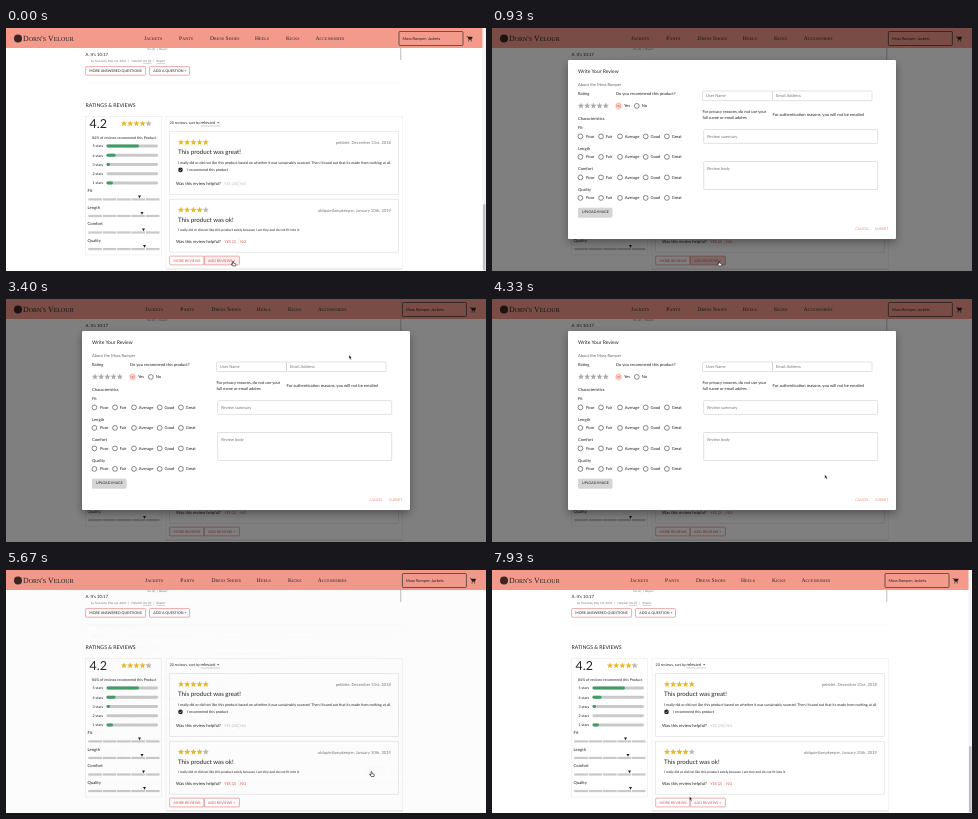
These frames come from a looping animation (480x243 px, 8000 ms). An HTML page:

```html
<!DOCTYPE html>
<html lang="en">
<head>
<meta charset="utf-8">
<title>Product reviews</title>
<style>
  html, body { margin: 0; width: 100%; height: 100%; overflow: hidden; background: #fff; }
  svg { display: block; width: 100%; height: 100%; }
  text { font-family: Lato, "Open Sans", sans-serif; text-rendering: geometricPrecision; white-space: pre; }
  .serif text { font-family: "Liberation Serif", "Noto Serif", serif; font-variant: small-caps; }
</style>
</head>
<body>
<svg id="stage" viewBox="0 0 480 243" xmlns="http://www.w3.org/2000/svg"></svg>
<script>
const LOOP = 8000;
const OPEN = 565, OPEN_MS = 225, CLOSE = 5495, CLOSE_MS = 215;
const INK = '#222', RED = '#d9534f', CORAL = '#ec8a7a', GOLD = '#e9b824', GREY = '#aaa';

// Markup helpers
const text = (x, y, size, str, fill = INK, extra = '') =>
  `<text x="${x}" y="${y}" font-size="${size}" fill="${fill}" ${extra}>${str}</text>`;
const rect = (x, y, w, h, fill, extra = '') =>
  `<rect x="${x}" y="${y}" width="${w}" height="${h}" fill="${fill}" ${extra}/>`;
const line = (x1, y1, x2, y2, stroke, w = .5) =>
  `<path d="M${x1} ${y1}L${x2} ${y2}" stroke="${stroke}" stroke-width="${w}"/>`;
const stroke = (color, w = .5) => `stroke="${color}" stroke-width="${w}"`;
const bold = 'font-weight="700"';

function star(cx, cy, r, fill) {
  let d = '';
  for (let i = 0; i < 10; i++) {
    const a = Math.PI * (i / 5 - .5), q = i % 2 ? r * .45 : r;
    d += (i ? 'L' : 'M') + (cx + q * Math.cos(a)).toFixed(2) + ' ' + (cy + q * Math.sin(a)).toFixed(2);
  }
  return `<path d="${d}Z" fill="${fill}"/>`;
}
const stars = (x, y, full, empty = '#bbb') =>
  [0, 1, 2, 3, 4].map(i => star(x + 6.2 * i, y, 3.2, i < full ? GOLD : empty)).join('');

const outlined = (x, y, w, h, label, tx, color) =>
  rect(x, y, w, h, 'none', stroke('#e58a8a', .7) + ' rx=".8"') + text(tx, y + 5.8, 3.6, label, color);

function header() {
  return `<g id="bar">${rect(0, 0, 480, 20, '#f39a8b')}</g>
    <circle cx="12" cy="10.5" r="4" fill="#3a2522"/>
    <g class="serif">${text(17, 13.3, 7.9, "Dorn's Velour")}<g id="nav"></g></g>
    <g id="search">${rect(393, 3.5, 64, 14, 'none', stroke('#333', .7) + ' rx=".8"')}
      ${text(396.5, 11.9, 3.9, 'Moss Romper; Jackets')}
      <path d="M460.6 8.4h1l1.2 3h2.6l.9-2.4h-4.2" fill="#222" stroke="#222" stroke-width=".5"/>
      <circle cx="462.7" cy="12.8" r=".6" fill="#222"/><circle cx="465.2" cy="12.8" r=".6" fill="#222"/></g>`;
}

function summary() {
  const fills = [32.5, 9, 3.5, 0, 6.5];
  const bars = fills.map((w, i) => {
    const y = 118 + 9.25 * i;
    return text(86.5, y + 1.3, 3.65, `${5 - i} star${i < 4 ? 's' : 's'}`) +
      rect(100.5, y - 1.4, 51.5, 2.8, '#c9c9c9', 'rx="1.4"') +
      (w ? rect(100.5, y - 1.4, w, 2.8, '#3f9d63', 'rx="1.4"') : '');
  }).join('');
  const marks = { Fit: 133.5, Length: 136, Comfort: 137.5, Quality: 138.5 };
  const scales = Object.keys(marks).map((name, i) => {
    const y = 171.4 + 16.55 * i, m = marks[name];
    let s = text(81.6, y - 7.4, 4.15, name);
    for (let k = 0; k < 5; k++) s += rect(82.3 + 14.4 * k, y - 1.1, 13.6, 2.2, '#c9c9c9');
    return s + `<path d="M${m - 1.5} ${y - 4}h3l-1.5 2.8z" fill="#222"/>`;
  }).join('');
  return rect(79.5, 88.5, 76, 138.5, '#fff', stroke('#e6e6e6')) +
    text(83.6, 100.3, 12.4, '4.2') + stars(118, 95.6, 4) +
    rect(139.8, 92, 1.9, 7, GOLD, 'clip-path="url(#part)"') +
    text(86, 110.8, 3.63, '84% of reviews recommend this Product') + bars + scales;
}

function review(y, h, o) {
  const top = y + 10.8;
  return rect(163.7, y, 228.8, h, '#fff', stroke('#dcdcdc', .6)) + stars(175, top, o.stars) +
    text(385, top + 1.5, 4.15, o.by, '#777', 'text-anchor="end"') +
    text(172, top + 12.1, 6.17, o.title) + text(172, top + 21.3, o.size, o.body) +
    text(170, o.foot, 4.24, 'Was this review helpful?') +
    text(218.3, o.foot, 3.75, `YES (${o.yes})`, o.color) + text(234.3, o.foot, 3.75, 'NO', o.color) +
    line(232.8, o.foot - 5, 232.8, o.foot + 1.6, '#ddd');
}

function page() {
  return text(141, 22.1, 2.9, 'Yes (2)  |  Report', '#777') +
    rect(394, 20, 1.4, 12, '#cfcfcf') +
    text(79.5, 28.4, 4.3, "A. It's 10:17") +
    text(85, 34.2, 2.95, 'by TovLindq, May 1st, 2012   |   Helpful? <tspan text-decoration="underline">Yes (0)</tspan>   |   <tspan text-decoration="underline">Report</tspan>', '#777') +
    outlined(79.6, 38.6, 60, 8.6, 'MORE ANSWERED QUESTIONS', 83.3, INK) +
    outlined(143.5, 38.6, 40, 8.6, 'ADD A QUESTION +', 147.3, INK) +
    line(79.5, 55, 396, 55, '#f3f3f3') +
    text(79.5, 78.8, 5.2, 'RATINGS &amp; REVIEWS') + summary() +
    rect(160, 88.5, 236.5, 152.5, 'none', stroke('#e9e9e9')) +
    line(160, 241, 396.5, 241, '#d5d5d5', .6) +
    text(163.6, 96.3, 3.67, '20 reviews, sort by') + text(194.6, 96.3, 4.15, 'relevant') +
    line(194.6, 98, 214, 98, '#888', .4) + '<path d="M211 94.2h2.4l-1.2 1.4z" fill="#444"/>' +
    review(103.5, 63, { stars: 5, by: 'pebblet, December 31st, 2018', title: 'This product was great!', size: 3.67,
      body: 'I really did or did not like this product based on whether it was sustainably sourced. Then I found out that its made from nothing at all.',
      foot: 157.3, yes: 20, color: '#bbb' }) +
    '<circle cx="174.5" cy="141.9" r="2.3" fill="#222"/><path d="M173.4 142l.8.8 1.4-1.6" fill="none" stroke="#fff" stroke-width=".5"/>' +
    text(181, 143.2, 3.67, 'I recommend this product') +
    review(171.2, 53, { stars: 4, by: 'oldquietlampkeeper, January 10th, 2019', title: 'This product was ok!', size: 3.38,
      body: 'I really did or did not like this product solely because I am tiny and do not fit into it.',
      foot: 214.6, yes: 2, color: RED }) +
    `<g clip-path="url(#addBox)">${rect(198, 228, 35.5, 9, RED, 'id="addHover"')}
      <circle id="addWave" cx="227" cy="234" fill="${RED}"/></g>` +
    outlined(163.7, 228.1, 34.4, 8.8, 'MORE REVIEWS', 167.6, RED) +
    outlined(198.1, 228.1, 35.3, 8.8, 'ADD REVIEWS +', 202, RED);
}

const FIELDS = [[210.5, 63, 70, 9.6, 'User Name'], [280.5, 63, 99.5, 9.6, 'Email Address'],
  [211.7, 101.6, 174, 13.8, 'Review summary'], [211.7, 133.5, 174, 28, 'Review body']];

const radio = (x, y) => `<circle cx="${x}" cy="${y}" r="2.4" fill="none" ${stroke('#555', .7)}/>`;

function dialog() {
  const opts = { Poor: 88.4, Fair: 109, Average: 128, Good: 153.7, Great: 174.9 };
  const rows = ['Fit', 'Length', 'Comfort', 'Quality'].map((name, i) => {
    const y = 108.4 + 20.5 * i;
    return text(86, y - 7, 4.1, name) + Object.keys(opts).map(k =>
      radio(opts[k], y) + text(opts[k] + (k === 'Poor' ? 5.6 : 4.8), y + 1.4, 4.1, k)).join('');
  }).join('');
  const fields = FIELDS.map(([x, y, w, h, label], i) =>
    rect(x, y, w, h, 'none', `class="field" rx=".8" ${stroke('#c4c4c4')}`) +
    text(x + 3.5, y + (i < 2 ? 6.3 : 8.3), 4.05, label, '#777')).join('');
  return rect(76, 32, 328, 179, '#fff', 'rx="1.3" filter="url(#shade)"') +
    text(86, 45.3, 5.03, 'Write Your Review') + text(86, 58.3, 4.05, 'About the Moss Romper', '#666') +
    text(86, 67.1, 4.1, 'Rating') + text(124, 67.1, 4.08, 'Do you recommend this product?') +
    stars(89, 77.8, 0, GREY) +
    `<circle cx="126.6" cy="77.9" r="4" fill="${CORAL}" opacity=".15"/>
     <circle cx="126.6" cy="77.9" r="2.4" fill="none" ${stroke(CORAL, .7)}/><circle cx="126.6" cy="77.9" r="1.2" fill="${CORAL}"/>` +
    text(132, 79.3, 4.1, 'Yes') + radio(144.8, 77.9) + text(149.8, 79.3, 4.1, 'No') +
    text(86, 91.6, 4.1, 'Characteristics') + rows +
    rect(86, 179.7, 34.3, 8.8, '#d5d5d5', 'rx="1" filter="url(#lift)"') + text(90, 185.4, 3.58, 'UPLOAD IMAGE') +
    fields +
    text(210.5, 84.9, 4.05, 'For privacy reasons, do not use your') + text(210.5, 90.8, 4.05, 'full name or email addres') +
    text(280.5, 87.8, 4.12, 'For authentication reasons, you will not be emailed') +
    `<g clip-path="url(#cancelBox)">${rect(361, 195.6, 18, 9.6, CORAL, 'id="cancelHover"')}
      <circle id="cancelWave" cx="365.5" cy="202.5" fill="${CORAL}"/></g>` +
    text(363.2, 201.9, 3.55, 'CANCEL', CORAL) + text(383, 201.9, 3.6, 'SUBMIT', CORAL);
}

const cursors = `<g id="cursor" stroke-linejoin="round">
  <path id="arrow" d="M0 0v3.9l.9-.8.7 1.6.8-.3-.7-1.6h1.2z" fill="#111" stroke="#fff" stroke-width=".35"/>
  <path id="beam" d="M-1.1-3h2.2M-1.1 3h2.2M0-3v6" fill="none" stroke="#222" stroke-width=".6"/>
  <path id="hand" d="M-.5-.6q.6-.5 1 0v1.7l1.8.5q.6.2.5.8l-.3 1.6h-2.8l-1.7-2q.4-.6 1.5.3z" fill="#fff" stroke="#111" stroke-width=".6"/></g>`;

const svg = document.getElementById('stage');
svg.innerHTML = `<defs>
    <clipPath id="addBox">${rect(198, 228, 35.5, 9, '#000')}</clipPath>
    <clipPath id="cancelBox">${rect(361, 195.6, 18, 9.6, '#000', 'rx="1"')}</clipPath>
    <clipPath id="part">${star(142.8, 95.6, 3.2, '#000')}</clipPath>
    <filter id="shade" x="-10%" y="-10%" width="120%" height="125%"><feDropShadow dx="0" dy="3.5" stdDeviation="4" flood-opacity=".35"/></filter>
    <filter id="lift" x="-10%" y="-20%" width="120%" height="160%"><feDropShadow dx="0" dy=".6" stdDeviation=".6" flood-opacity=".4"/></filter>
  </defs>` + rect(0, 0, 480, 243, '#fff') + page() + header() +
  `<g id="scroll">${rect(476.5, 0, 3.5, 243, '#f4f4f4')}${rect(477, 176, 2.5, 66.5, '#bfbfbf', 'rx="1.2"')}</g>
  <g id="modal">${rect(0, 0, 480, 243, '#000', 'opacity=".5"')}</g><g id="paper">${dialog()}</g>` + cursors;

const $ = id => document.getElementById(id);
const set = (id, o) => { for (const k in o) $(id).setAttribute(k, o[k]); };
const show = (id, on) => $(id).setAttribute('visibility', on ? 'visible' : 'hidden');

const NAV = { Jackets: 138, Pants: 173, 'Dress Shoes': 204, Heels: 249, Kicks: 280, Accessories: 309.5 };
$('nav').innerHTML = Object.keys(NAV).map(k => text(NAV[k], 12.1, 5.5, k, INK, 'letter-spacing=".1"')).join('');
const links = [...$('nav').children], fieldBoxes = [...document.querySelectorAll('.field')];

const clamp = v => Math.max(0, Math.min(1, v));
const ramp = (t, a, b) => clamp((t - a) / (b - a));
const smooth = p => p * p * (3 - 2 * p);

// cubic-bezier(.4, 0, .2, 1)
function ease(x) {
  if (x <= 0 || x >= 1) return clamp(x);
  let lo = 0, hi = 1, u;
  for (let i = 0; i < 20; i++) {
    u = (lo + hi) / 2;
    const bx = 1.2 * u * (1 - u) ** 2 + .6 * u * u * (1 - u) + u ** 3;
    if (bx < x) lo = u; else hi = u;
  }
  return u * u * (3 - 2 * u);
}

// Pointer stops: time, x, y
const PATH = [[0, 227, 234], [1250, 227, 234], [1520, 290, 160], [1780, 210, 110], [2070, 123.7, 67.6],
  [2350, 98, 78], [2620, 112, 150], [2800, 210, 118], [2980, 334, 66], [3400, 343, 56], [3600, 300, 68],
  [3800, 298, 110], [4150, 310, 148], [4400, 338, 182], [4600, 365.5, 202.5], [6470, 365.5, 202.5],
  [7270, 228, 234], [7330, 228, 234], [7930, 197.5, 226.5], [8000, 197.5, 226.5]];

function pointer(t) {
  const i = Math.max(1, PATH.findIndex(p => p[0] > t));
  const [t0, x0, y0] = PATH[i - 1], [t1, x1, y1] = PATH[i];
  const p = smooth(ramp(t, t0, t1));
  return [x0 + (x1 - x0) * p, y0 + (y1 - y0) * p];
}

const inside = (x, y, [l, t, w, h]) => x >= l && x <= l + w && y >= t && y <= t + h;
const ADD = [198, 228, 35.5, 9], MORE = [163.7, 228, 34.3, 9], CANCEL = [361, 195.6, 18, 9.6];
const RATING = [86, 74.5, 31, 6.5], QUESTION = [123, 63, 60, 6];

function ripple(id, t, start, reach, fade) {
  set(id, { r: reach * smooth(ramp(t, start, start + 260)),
    opacity: t < start ? 0 : .4 * (1 - ramp(t, start + fade, start + fade + 400)) });
}

function draw(t) {
  const open = t >= OPEN && t < CLOSE + CLOSE_MS;
  const alpha = t < CLOSE ? ease(ramp(t, OPEN, OPEN + OPEN_MS)) : 1 - ease(ramp(t, CLOSE, CLOSE + CLOSE_MS));
  set('modal', { opacity: alpha });
  set('paper', { opacity: alpha });
  show('scroll', !open);

  // The header widens while the scrollbar is gone
  const k = open ? 480 / 476.5 : 1;
  links.forEach((el, i) => el.setAttribute('x', Object.values(NAV)[i] * k));
  set('search', { transform: `translate(${open ? 3.4 : 0} 0)` });

  const [x, y] = pointer(t);
  const onAdd = !open && inside(x, y, ADD), onCancel = open && inside(x, y, CANCEL);
  set('addHover', { opacity: onAdd ? .1 : 0 });
  set('cancelHover', { opacity: onCancel ? .12 : 0 });
  ripple('addWave', t, 400, 32, 400);
  ripple('cancelWave', t, 5440, 16, 300);

  let onField = false;
  FIELDS.forEach((f, i) => {
    const over = open && inside(x, y, f);
    onField = onField || over;
    fieldBoxes[i].setAttribute('stroke', over ? '#333' : '#c4c4c4');
  });
  const hand = onAdd || onCancel || (!open && inside(x, y, MORE)) || t < 1250 ||
    (open && inside(x, y, RATING)) || (t > CLOSE && t < 6000);
  const beam = !hand && (onField || (open && inside(x, y, QUESTION)));
  show('hand', hand);
  show('beam', beam);
  show('arrow', !hand && !beam);
  set('cursor', { transform: `translate(${x.toFixed(2)} ${y.toFixed(2)})` });
}

const begin = performance.now();
function tick() {
  draw((performance.now() - begin) % LOOP);
  requestAnimationFrame(tick);
}
tick();
</script>
</body>
</html>
```
